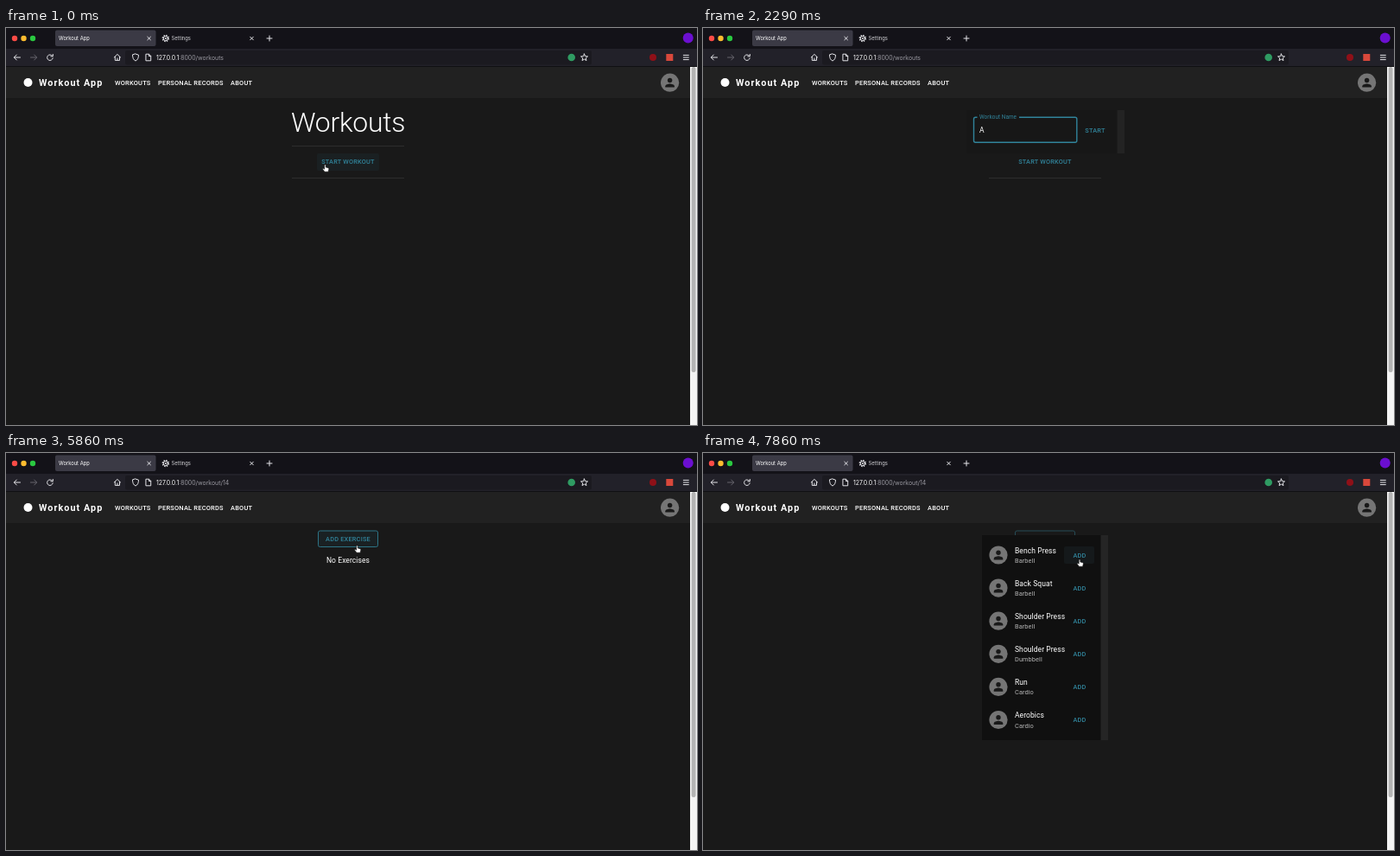
Animation, 800 px wide and 459 px high, one loop 8000 ms. Source, as an HTML page:

```html
<!DOCTYPE html>
<html lang="en">
<head>
<meta charset="utf-8">
<title>Workout App</title>
<style>
html, body { margin: 0; width: 100%; height: 100%; overflow: hidden; background: #191919 }
svg { display: block; width: 100vw; height: 100vh }
text { font: 400 8.5px Roboto, sans-serif; fill: #fff; letter-spacing: .009em; white-space: pre }
.ui { font: 5.8px Inter, sans-serif; letter-spacing: 0 }
.url { font-size: 6.9px }
.dim { fill: #9b9aa2 }
.brand { font-size: 10.8px; font-weight: 700; letter-spacing: 1.05px }
.nav { font-size: 7.45px; font-weight: 500; letter-spacing: .029em }
.btn { font-size: 7.35px; font-weight: 500; letter-spacing: .029em; fill: #31849b }
.head { font-size: 31.9px; font-weight: 300; letter-spacing: -.008em }
.label { font-size: 6.37px; fill: #c4c4c4 }
.sub { font-size: 7.4px; fill: #b4b4b4 }
.mid { text-anchor: middle }
.line { fill: none; stroke: #e4e4e8; stroke-width: 1; stroke-linecap: round; stroke-linejoin: round }
.box { fill: none; stroke: #fff }
.focus .box { stroke: #31849b; stroke-width: 1.4 }
.focus .label { fill: #31849b }
</style>
</head>
<body>
<svg viewBox="0 0 800 459" preserveAspectRatio="none">
  <defs>
    <g id="avatar">
      <circle r="10.6" fill="#757575"/>
      <circle cy="-2.7" r="2.7" fill="#191919"/>
      <path d="M-5.3 5.4V4C-5.3 2.1-1.8 1.2 0 1.2S5.3 2.1 5.3 4V5.4Z" fill="#191919"/>
    </g>
    <path id="close" class="line" d="M-1.8-1.8 1.8 1.8M1.8-1.8-1.8 1.8"/>
  </defs>

  <rect width="800" height="459" fill="#191919"/>
  <g id="page">
    <rect y="45" width="800" height="36" fill="#212121"/>
    <circle cx="25.5" cy="63" r="5" fill="#fff"/>
    <text class="brand" x="38" y="66.8">Workout App</text>
    <g>
      <text class="nav" x="126" y="65.7">WORKOUTS</text>
      <text class="nav" x="176" y="65.7">PERSONAL RECORDS</text>
      <text class="nav" x="260" y="65.7">ABOUT</text>
    </g>
    <use href="#avatar" x="768.6" y="63.2"/>
    <g id="home">
      <text class="head mid" x="396" y="119.6">Workouts</text>
      <path d="M331 136.5H461M331 173.5H461" stroke="#2d2d2d"/>
      <rect id="startHover" x="360" y="145" width="72" height="20" rx="2" fill="#1a2022"/>
      <text class="btn mid" x="396" y="157.4">START WORKOUT</text>
    </g>
    <g id="workout">
      <g id="dots" fill="#757575"><circle cx="385" r="4.2"/><circle cx="395.5" r="4.2"/><circle cx="406" r="4.2"/></g>
      <g id="add">
        <rect id="addBox" x="361.5" y="90" width="69" height="18.5" rx="2"/>
        <text class="btn mid" x="396" y="101.9">ADD EXERCISE</text>
      </g>
      <text id="empty" class="mid" x="396" y="126.6">No Exercises</text>
    </g>
  </g>

  <g id="naming">
    <rect x="305" y="95" width="175" height="50" fill="#171717"/>
    <rect x="479.5" y="95" width="8.5" height="50" fill="#232323"/>
    <rect class="box" x="313.5" y="103.3" width="119.3" height="29" rx="2"/>
    <rect x="317.5" y="101" width="48.5" height="5" fill="#171717"/>
    <text class="label" x="320" y="105.3">Workout Name</text>
    <rect id="selection" x="319.5" y="111.5" width="53" height="12" fill="#35607f"/>
    <text id="field" x="320" y="121"></text>
    <rect id="goHover" x="437" y="108" width="34" height="20" rx="2" fill="#1a2022"/>
    <text class="btn mid" x="454" y="120.6">START</text>
  </g>

  <g id="picker">
    <rect x="323" y="95" width="138" height="237" fill="#101010"/>
    <rect x="460.5" y="95" width="8.5" height="237" fill="#252525"/>
    <rect id="rowHover" x="418" y="108" width="35" height="20" rx="2" fill="#15191b"/>
    <g id="rows"></g>
  </g>

  <g id="chrome">
    <rect width="800" height="24" fill="#131218"/>
    <rect y="24" width="800" height="21" fill="#222129"/>
    <rect y="44.2" width="800" height=".8" fill="#0c0c0e"/>
    <circle cx="10" cy="12" r="3.2" fill="#fb4b46"/>
    <circle cx="20.5" cy="12" r="3.2" fill="#fdbc2f"/>
    <circle cx="31" cy="12" r="3.2" fill="#2ac840"/>
    <rect x="57" y="2.5" width="116.5" height="18.5" rx="2" fill="#3b3a45"/>
    <text class="ui" x="61" y="14.2">Workout App</text>
    <use href="#close" x="165.6" y="12"/>
    <circle class="line" cx="184.8" cy="12" r="3.4" stroke-dasharray="1.4 1.27" style="stroke-width:1.6;stroke-linecap:butt"/>
    <circle class="line" cx="184.8" cy="12" r="2.6"/>
    <circle cx="184.8" cy="12" r="1" fill="#e4e4e8"/>
    <text class="ui" x="191.5" y="14.2" style="fill:#d4d4d8">Settings</text>
    <use href="#close" x="284.5" y="12"/>
    <path class="line" d="M302 12H308M305 9V15"/>
    <circle cx="789.7" cy="11.6" r="6" fill="#6b0fd0"/>

    <path class="line" d="M16.5 34H9.5M12.3 31 9.3 34 12.3 37"/>
    <path class="line" d="M28.5 34H35.5M32.7 31 35.7 34 32.7 37" style="stroke:#66656d"/>
    <path class="line" d="M53.6 32.2A3.3 3.3 0 1 0 54.2 34.8M54.3 30.4V32.8H51.9"/>
    <path class="line" d="M125.2 34 128.9 30.4 132.6 34M126.3 33.5V37.4H131.5V33.5M128.9 37V35"/>
    <rect x="138" y="26" width="540" height="16.5" rx="2" fill="#1b1a20"/>
    <path class="line" d="M150 30 153.5 31.2C153.5 34.8 152.3 37 150 38 147.7 37 146.5 34.8 146.5 31.2Z"/>
    <path class="line" d="M162.3 30.2H165.6L167.7 32.3V37.8H162.3ZM165.4 30.4V32.5H167.5"/>
    <text class="ui url" x="174" y="36.6">127.0.0.1<tspan class="dim">:8000/</tspan><tspan id="path" class="dim"></tspan></text>
    <circle cx="654.7" cy="34" r="4.3" fill="#2f9b62"/>
    <path class="line" id="star"/>
    <circle cx="749" cy="34" r="4" fill="#8f1018"/>
    <rect x="764.3" y="30" width="8" height="8" fill="#d9483b"/>
    <path class="line" d="M784.3 31.4H790.3M784.3 34H790.3M784.3 36.6H790.3"/>
  </g>
  <rect x="792" y="45" width="8" height="414" fill="#f4f4f4"/>
  <rect id="thumb" x="793.6" y="45" width="5" height="353" rx="2.5" fill="#b4b4b4"/>

  <g id="cursor">
    <path id="arrow" d="M0 0V7.6L1.8 6 3 8.6 4.2 8.1 3.1 5.5H5.4Z" fill="#111" stroke="#ddd" stroke-width=".8"/>
    <path id="hand" d="M-.8.4Q0-.6.8.4V3L3.6 3.7Q4.5 4 4.3 5.2L3.6 8.2H-.6L-2.8 5.2Q-2.8 4-1.8 4.4L-.8 5.2Z" fill="#fff" stroke="#111" stroke-width=".6"/>
    <path id="beam" d="M-2-4.5Q0-4.5 0-3.2 0-4.5 2-4.5M0-3.4V3.4M-2 4.5Q0 4.5 0 3.2 0 4.5 2 4.5M-1 1H1" fill="none" stroke="#ddd" stroke-width=".9"/>
  </g>
</svg>
<script>
const $ = id => document.getElementById(id);
const show = (id, on) => $(id).setAttribute('opacity', Math.max(0, Math.min(1, +on)));
const move = (id, x, y) => $(id).setAttribute('transform', `translate(${x} ${y})`);
const within = (n, a, b) => n >= a && n < b;

// Linear blend through [step, ...values] keys
function blend(keys, n) {
  const i = keys.findIndex(k => k[0] > n);
  if (i < 0) return keys[keys.length - 1].slice(1);
  const a = keys[i - 1], b = keys[i], f = (n - a[0]) / (b[0] - a[0]);
  return a.slice(1).map((v, j) => v + (b[j + 1] - v) * f);
}

const exercises = [
  ['Bench Press', 'Barbell'], ['Back Squat', 'Barbell'], ['Shoulder Press', 'Barbell'],
  ['Shoulder Press', 'Dumbbell'], ['Run', 'Cardio'], ['Aerobics', 'Cardio']
];
$('rows').innerHTML = exercises.map(([name, kind], i) => `
  <g transform="translate(0 ${i * 38.1})">
    <use href="#avatar" x="342" y="118"/>
    <text x="361" y="115.6">${name}</text>
    <text class="sub" x="361" y="127">${kind}</text>
    <text class="btn mid" x="436" y="120.6">ADD</text>
  </g>`).join('');

$('star').setAttribute('d', 'M' + Array.from({length: 10}, (_, i) => {
  const r = i % 2 ? 1.9 : 4.2, a = i * Math.PI / 5;
  return `${669.5 + r * Math.sin(a)} ${34.2 - r * Math.cos(a)}`;
}).join('L') + 'Z');

const track = [
  [0, 369.5, 158], [3, 369.5, 158], [6, 383, 127.5], [8, 383, 127.5], [10, 373, 118],
  [25, 376, 119], [28, 454, 120], [30, 454, 120], [32, 457, 122], [36, 457, 122],
  [40, 406.5, 107], [45, 406.5, 107], [48, 393.5, 171], [52, 380, 263], [55, 436, 123]
];
const scrolling = [[0, 0], [46, 0], [48, 8.5], [49, 8.5], [51, 0]];
const name = 'A Workout';

function fieldText(n) {
  if (n < 14) return 'New Workout';
  if (n < 16) return '';
  return name.slice(0, 1 + Math.round((n - 16) * 8 / 7));
}

// n counts steps of a seventh of a second
function draw(n) {
  const home = n < 30, loading = within(n, 30, 34);
  show('home', home);
  show('workout', !home);
  show('startHover', n < 3);
  $('path').textContent = home ? 'workouts' : 'workout/14';

  show('naming', home && (n - 2) / 2);
  $('naming').setAttribute('class', n >= 10 ? 'focus' : '');
  show('selection', within(n, 11, 14));
  show('goHover', n >= 28);
  $('field').textContent = fieldText(n);

  show('dots', loading);
  [...$('dots').children].forEach((dot, i) =>
    dot.setAttribute('cy', 105 + .6 * Math.sin((n - 33) * 1.5 - 1 + i * 2.1)));
  move('add', 0, loading ? 37.8 : 0);
  const hover = within(n, 40, 45);
  $('addBox').setAttribute('fill', hover ? '#1a2123' : 'none');
  $('addBox').setAttribute('stroke', hover ? '#2d7486' : '#264c56');
  show('empty', !loading);

  show('picker', (n - 41) / 2);
  show('rowHover', n >= 55);

  const [scroll] = blend(scrolling, n);
  move('page', 0, -scroll);
  move('thumb', 0, scroll * .9);

  const beam = within(n, 5, 27);
  const hand = n < 5 || within(n, 27, 30) || within(n, 40, 45) || n >= 55;
  move('cursor', ...blend(track, n));
  show('cursor', !within(n, 14, 25));
  show('beam', beam);
  show('hand', hand);
  show('arrow', !beam && !hand);
}

function tick(now) {
  draw(Math.floor((now % 8000 + 5) * .007) % 56);
  requestAnimationFrame(tick);
}
draw(0);
requestAnimationFrame(tick);
</script>
</body>
</html>
```
